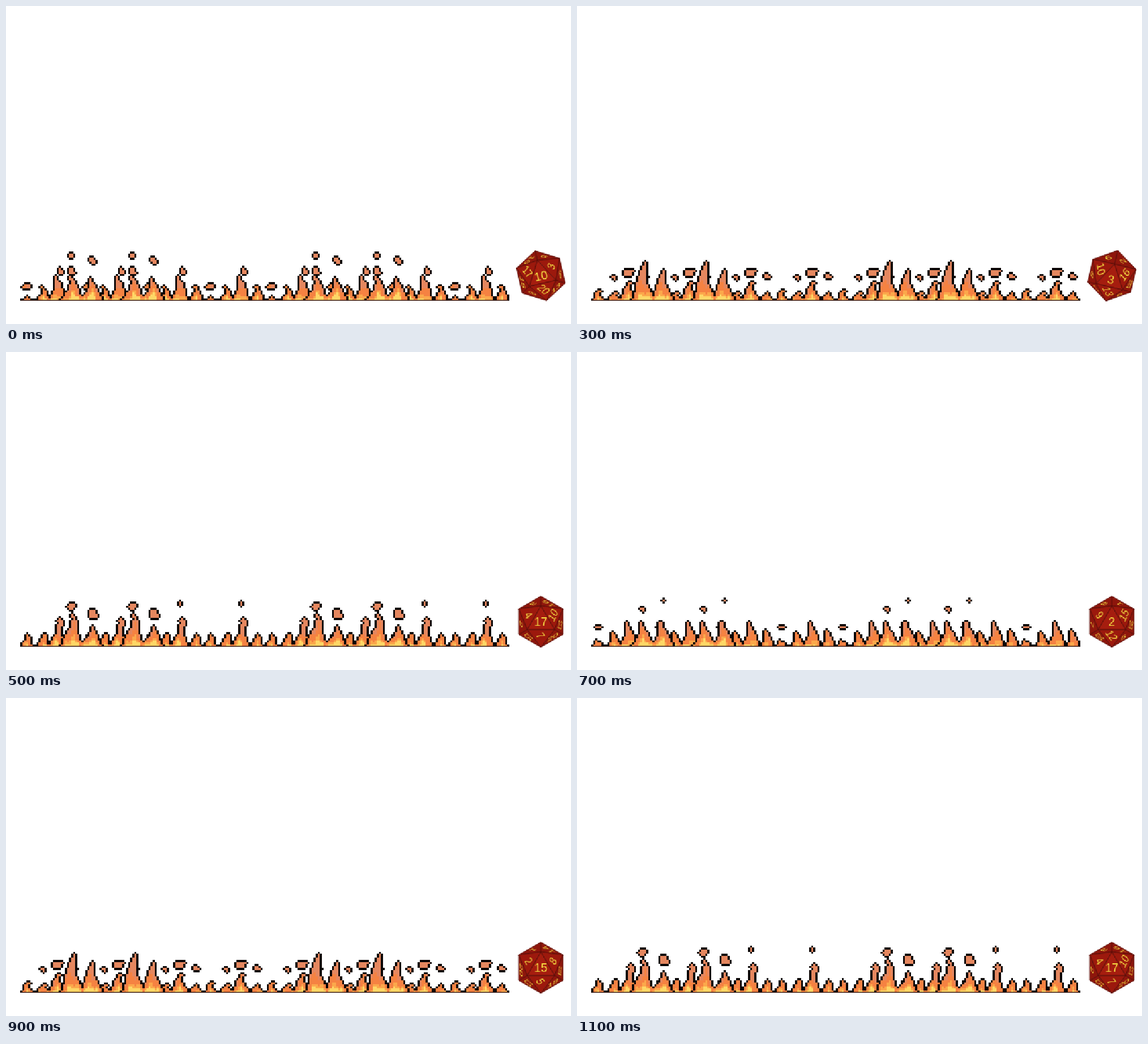
Recreate the animation shown at these times as an HTML page with a canvas. Size 998x561 px, loop 1.2 s.

```html
<!DOCTYPE html>
<html lang="en">
<head>
<meta charset="utf-8">
<title>Fire and die</title>
<style>
  html, body { margin: 0; width: 100%; height: 100%; overflow: hidden; background: #fff; }
  canvas { display: block; width: 998px; height: 561px; }
</style>
</head>
<body>
<canvas id="stage" width="998" height="561"></canvas>
<script>
const ctx = document.getElementById('stage').getContext('2d');
const STEP = 100, STEPS = 12, PHASES = 6;

// ---------- fire ----------
const LEFT = 25, BASE = 519.5, PITCH = 108, PX = 3.6;
const FIRST_COL = -2, LAST_COL = 46, ROWS = 26;

const age = (phase, birth) => (phase - birth + PHASES) % PHASES;
const grow = (phase, birth, height, rate) => height + rate * age(phase, birth);

// A shape answers whether a point (x, height above the ground) burns.
function tongue(phase, x, width, height, sway) {
  const top = height - PX, beat = phase * Math.PI / 3 - .8;
  return (px, up) => {
    const u = up / top;
    if (u > 1) return false;
    const centre = x + sway * u * Math.sin(5 * u + beat);
    return Math.abs(px - centre) < 2 + (width - 4) * (1 - Math.max(u, 0)) ** 1.5;
  };
}

// Embers break off a tip, rise and shrink until their life is over.
function ember(phase, birth, life, x, up, rise, w, h, slant = .25) {
  const t = age(phase, birth);
  if (t >= life) return () => false;
  const shrink = 1 - .2 * t;
  const rx = Math.max(w * shrink / 2 - 3, 2.6), ry = Math.max(h * shrink / 2 - 3, 2.6);
  return (px, py) => {
    const dy = py - up - rise * t;
    return Math.abs((px - x - slant * dy) / rx) ** 3 + Math.abs(dy / ry) ** 3 < 1;
  };
}

const smallFire = p => [
  tongue(p, 37, 11, grow(p, 0, 11, 3), 3),
  tongue(p, 66, 12, Math.min(grow(p, 2, 12, 5), 28), 3),
  tongue(p, 91, 17, grow(p, 3, 36, 3), 4),
  tongue(p, 120, 13, grow(p, 2, 14, 4), 3),
  ember(p, 0, 3, 37, 24, 10, 20, 13),
  ember(p, 2, 3, 66, 30, 11, 17, 16),
  ember(p, 2, 3, 120, 30, 13, 18, 16, -.25),
  ember(p, 3, 2, 90, 49, 12, 23, 19),
  ember(p, 5, 2, 96, 42, 10, 15, 20, -.25)
];
const bigFire = p => [
  tongue(p, 117, 22, 59 - 14 * Math.cos((p - .6) * Math.PI / 3), 5),
  tongue(p, 151, 22, grow(p, 4, 34, 4.5), 4),
  ember(p, 4, 3, 116, 63, 8, 24, 20),
  ember(p, 0, 2, 116, 52, 13, 14, 20, -.25),
  ember(p, 4, 4, 153, 47, 11, 24, 28, -.25)
];
const looseSpark = p => [ember(p, 5, 1, 92, 75, 0, 11, 14, -.25)];

function raster(shapes, phase, ground) {
  const burns = (c, r) => {
    const x = LEFT + (c + .5) * PX, up = (Math.max(r, 0) + .5) * PX;
    return shapes.some(hit => hit(x, up));
  };
  const ringBurns = (c, r, n, all) => {
    const ring = [burns(c - n, r), burns(c + n, r), burns(c, r - n), burns(c, r + n)];
    return all ? ring.every(Boolean) : ring.some(Boolean);
  };
  const cells = [];
  for (let c = FIRST_COL; c < LAST_COL; c++) {
    for (let r = 0; r < ROWS; r++) {
      if (burns(c, r)) {
        let depth = 1;
        while (depth < 5 && ringBurns(c, r, depth, true)) depth++;
        cells.push([c, r, fireColor(depth, c, r, phase)]);
      } else if (ringBurns(c, r, 1, false) || (ground && r === 0 && c >= 0 && c < PITCH / PX)) {
        cells.push([c, r, '#0b0606']);
      }
    }
  }
  return cells;
}

function fireColor(depth, c, r, phase) {
  const heat = depth * .8 - r * .3 + Math.sin(c * 1.3 + phase);
  return heat < -.9 ? '#e5875f' : heat < 1.6 ? '#f58242' : heat < 2.7 ? '#fba84b' : '#fed766';
}

const sprites = Array.from({ length: PHASES }, (_, p) => ({
  small: raster(smallFire(p), p, true),
  big: raster(bigFire(p), p, false),
  spark: raster(looseSpark(p), p, false)
}));

function stamp(cells, dx) {
  for (const [c, r, color] of cells) {
    const x = Math.round(LEFT + dx + c * PX), y = Math.round(BASE - (r + 1) * PX);
    ctx.fillStyle = color;
    ctx.fillRect(x, y, Math.round(LEFT + dx + (c + 1) * PX) - x, Math.round(BASE - r * PX) - y);
  }
}

// Eight small fires; the first two of every four carry a big one.
function drawFire(step) {
  const { small, big, spark } = sprites[step % PHASES];
  for (let k = 0; k < 8; k++) stamp(small, k * PITCH);
  for (let k = 0; k < 8; k++) stamp(k % 4 < 2 ? big : spark, k * PITCH);
  ctx.fillStyle = '#3a1d16';
  ctx.fillRect(LEFT + 1, BASE - 1, 8 * PITCH - 2, 1.5);
}

// ---------- die ----------
const DIE = 99, GRAIN = 1.5, CX = 945, CY = 475.5, RADIUS = 45.8;
const FRONTS = [10, 6, 11, 3, 18, 17, 14, 2, 8, 15, 5, 17];

// An icosahedron seen face-on: three near, six rim and three far vertices.
const verts = [];
for (let k = 0; k < 6; k++) {
  const a = (k * 60 - 90) * Math.PI / 180, near = k % 2 ? -1 : 1;
  verts.push([.607 * Math.cos(a), .607 * Math.sin(a), .795 * near]);
  verts.push([.982 * Math.cos(a), .982 * Math.sin(a), -.188 * near]);
}
const touch = (a, b) => Math.hypot(...a.map((v, i) => v - b[i])) < 1.1;
const faces = [];
for (let i = 0; i < 12; i++) for (let j = i + 1; j < 12; j++) for (let k = j + 1; k < 12; k++) {
  if (touch(verts[i], verts[j]) && touch(verts[j], verts[k]) && touch(verts[i], verts[k])) faces.push([i, j, k]);
}
const frontFace = faces.findIndex(f => f.join() === '0,4,8');

const unit = v => v.map(n => n / Math.hypot(...v));
const cross = (a, b) => [a[1] * b[2] - a[2] * b[1], a[2] * b[0] - a[0] * b[2], a[0] * b[1] - a[1] * b[0]];

const dieCanvas = document.createElement('canvas');
dieCanvas.width = dieCanvas.height = DIE / GRAIN;
const die = dieCanvas.getContext('2d');

// The die rocks over and back, then lands square to the viewer.
function rotation(step) {
  if (step > 4) return { turn: 0, tilt: 0 };
  const roll = Math.sin(step * Math.PI / 4);
  return { turn: (37 * roll - 13) * Math.PI / 180, tilt: .25 * roll };
}

function drawDie(step) {
  const { turn, tilt } = rotation(step);
  const pts = verts.map(([x, y, z]) => {
    const v = y * Math.cos(tilt) + z * Math.sin(tilt);
    return [
      x * Math.cos(turn) - v * Math.sin(turn),
      x * Math.sin(turn) + v * Math.cos(turn),
      z * Math.cos(tilt) - y * Math.sin(tilt)
    ];
  });
  const visible = faces.map((face, i) => {
    const corners = face.map(n => pts[n]);
    const mid = [0, 1, 2].map(n => (corners[0][n] + corners[1][n] + corners[2][n]) / 3);
    const number = (FRONTS[step] - 1 + 7 * (i - frontFace + 20)) % 20 + 1;
    return { corners, mid, number };
  }).filter(f => f.mid[2] > .01);

  die.setTransform(1, 0, 0, 1, 0, 0);
  die.clearRect(0, 0, DIE, DIE);
  die.setTransform(1 / GRAIN, 0, 0, 1 / GRAIN, DIE / 2 / GRAIN, DIE / 2 / GRAIN);
  die.lineJoin = 'round';
  die.lineWidth = 1.3;
  die.strokeStyle = '#5f0d08';
  for (const { corners, mid } of visible) {
    die.beginPath();
    for (const [x, y] of corners) die.lineTo(x * RADIUS, y * RADIUS);
    die.closePath();
    die.fillStyle = mid[2] > .7 ? '#a51d0f' : mid[2] > .4 ? '#9c190d' : '#8e160c';
    die.fill();
    die.stroke();
  }

  die.textAlign = 'center';
  die.textBaseline = 'middle';
  die.font = '21px "Liberation Sans", Arial, sans-serif';
  die.fillStyle = '#f5df43';
  for (const { corners, mid, number } of visible) {
    const down = unit(mid.map((n, i) => n - corners[0][i]));
    const right = cross(down, unit(mid));
    die.save();
    die.transform(right[0], right[1], down[0], down[1], mid[0] * RADIUS, mid[1] * RADIUS);
    die.fillText(number, 0, 2);
    die.restore();
  }
  ctx.imageSmoothingEnabled = false;
  ctx.drawImage(dieCanvas, CX - DIE / 2, CY - DIE / 2, DIE, DIE);
}

// ---------- loop ----------
let shown = -1;
function tick() {
  const step = Math.floor(performance.now() / STEP) % STEPS;
  if (step !== shown) {
    shown = step;
    ctx.fillStyle = '#fff';
    ctx.fillRect(0, 0, 998, 561);
    drawFire(step);
    drawDie(step);
  }
  requestAnimationFrame(tick);
}
tick();
</script>
</body>
</html>
```
